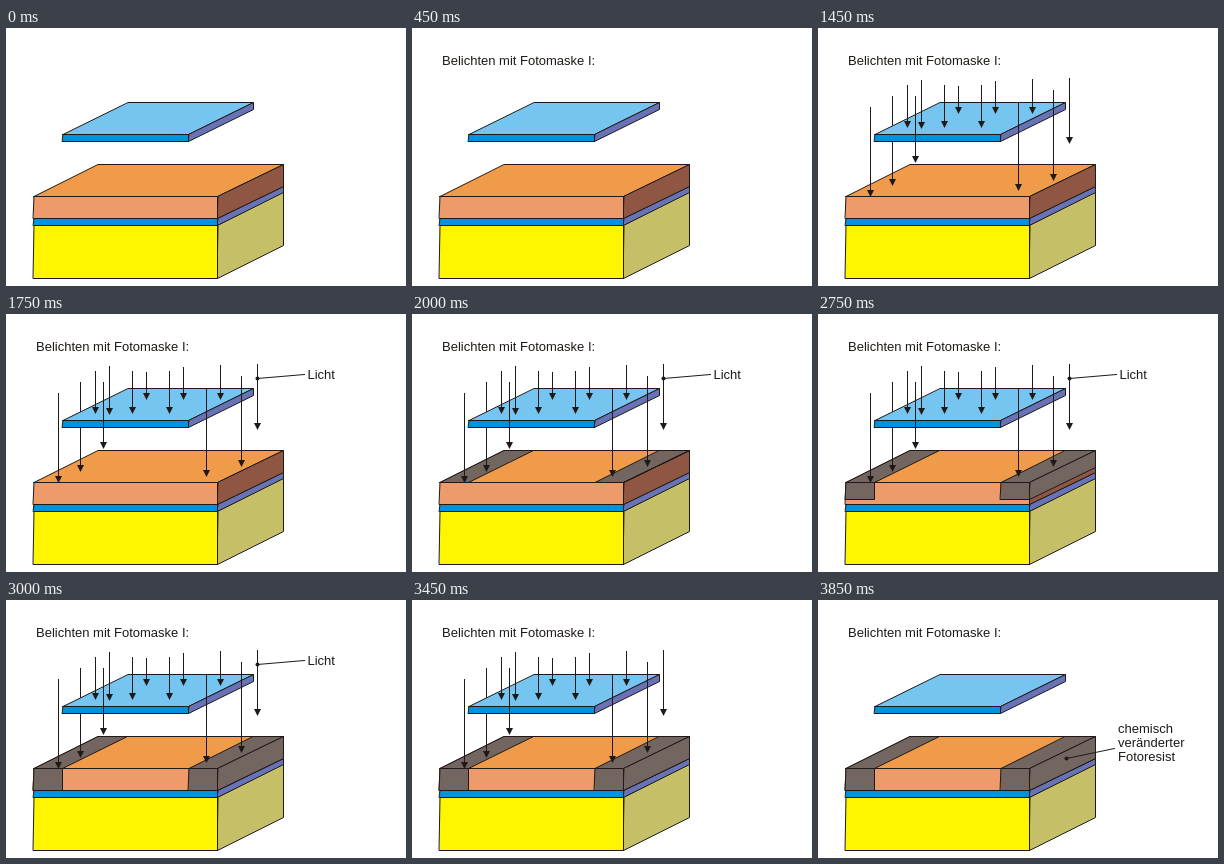
An HTML page with a canvas for the animation above (5850 ms loop, 400 by 258 pixels).

```html
<!DOCTYPE html>
<html lang="de">
<head>
<meta charset="utf-8">
<style>
html, body { margin: 0; width: 100%; height: 100%; overflow: hidden; background: #fff; }
canvas { display: block; }
</style>
</head>
<body>
<canvas id="stage" width="400" height="258"></canvas>
<script>
const ctx = document.getElementById('stage').getContext('2d');
const LOOP = 5850;
const INK = '#1f1a17', DARK = '#73655f';

// Each arrow: x, start y, tip y
const backArrows = [[74, 68, 158]];
const frontArrows = [
  [52, 79, 169], [89, 57, 100], [97, 68, 135], [103, 52, 101], [126, 57, 100],
  [140, 58, 86], [163, 57, 100], [177, 53, 86], [214, 51, 86], [200, 75, 163],
  [235, 62, 153], [251, 50, 116]
];

function poly(fill, points) {
  ctx.beginPath();
  for (const [x, y] of points) ctx.lineTo(x + .5, y + .5);
  ctx.closePath();
  ctx.fillStyle = fill;
  ctx.fill();
  ctx.stroke();
}

// Oblique box: front from l to r, back edge from bl to br, raised by dy
function box([l, r], [bl, br], y, h, dy, top, front, side) {
  const b = y + h;
  if (top) poly(top, [[l, y], [r, y], [br, y - dy], [bl, y - dy]]);
  if (side) poly(side, [[r, y], [br, y - dy], [br, b - dy], [r, b]]);
  poly(front, [[l, y], [r, y], [r, b], [l, b]]);
}

function line(x1, y1, x2, y2) {
  ctx.beginPath();
  ctx.moveTo(x1 + .5, y1 + .5);
  ctx.lineTo(x2 + .5, y2 + .5);
  ctx.stroke();
}

function dot(x, y) {
  ctx.beginPath();
  ctx.arc(x + .5, y + .5, 2, 0, 7);
  ctx.fillStyle = INK;
  ctx.fill();
}

function arrow([x, from, tip]) {
  line(x, from, x, tip - 5);
  ctx.beginPath();
  ctx.moveTo(x + .5, tip);
  ctx.lineTo(x - 3, tip - 7);
  ctx.lineTo(x + 4, tip - 7);
  ctx.fillStyle = INK;
  ctx.fill();
}

function label(text, x, y) {
  ctx.fillStyle = INK;
  ctx.fillText(text, x, y);
}

function draw(t) {
  const within = (from, to = LOOP) => t >= from && t < to;
  ctx.fillStyle = '#fff';
  ctx.fillRect(0, 0, 400, 258);
  ctx.strokeStyle = INK;
  ctx.lineWidth = 1;
  ctx.lineJoin = 'round';
  ctx.lineCap = 'square';
  ctx.font = '13px "Liberation Sans", Arial, sans-serif';

  const front = [27, 211], back = [92, 277];
  box(front, back, 190, 7, 32, null, '#0093dd', '#6773b6');
  box(front, back, 197, 53, 33, null, '#fff500', '#c5c068');
  box(front, back, 168, 22, 32, '#f09b4a', '#ee9b6b', '#8f5643');

  // Exposed resist darkens downwards in four steps
  if (within(2000)) {
    const depth = Math.round(Math.min(4, Math.floor((t - 2000) / 250)) * 5.5);
    box([27, 56], [92, 121], 168, depth, 32, DARK, DARK, null);
    box([182, 211], [247, 277], 168, depth, 32, DARK, DARK, DARK);
  }

  const light = within(1450, 3550);
  if (light) backArrows.forEach(arrow);
  box([56, 182], [122, 247], 106, 7, 32, '#76c5f0', '#0093dd', '#6773b6');
  if (light) frontArrows.forEach(arrow);

  if (within(1550, 3450)) dot(251, 64);
  if (within(1650, 3350)) line(251, 64, 298, 60);
  if (within(1750, 3250)) label('Licht', 301.5, 65);

  const words = ['Belichten', 'mit', 'Fotomaske I:'];
  label(words.filter((w, i) => within(250 + i * 100)).join(' '), 30, 37);

  ['chemisch', 'veränderter', 'Fotoresist'].forEach((word, i) => {
    if (within(3650 + i * 100)) label(word, 300, 133 + i * 14);
  });
  if (within(3850)) {
    line(248, 158, 296, 148);
    dot(248, 158);
  }
}

const start = performance.now();
function tick() {
  draw((performance.now() - start) % LOOP);
  requestAnimationFrame(tick);
}
tick();
</script>
</body>
</html>
```
